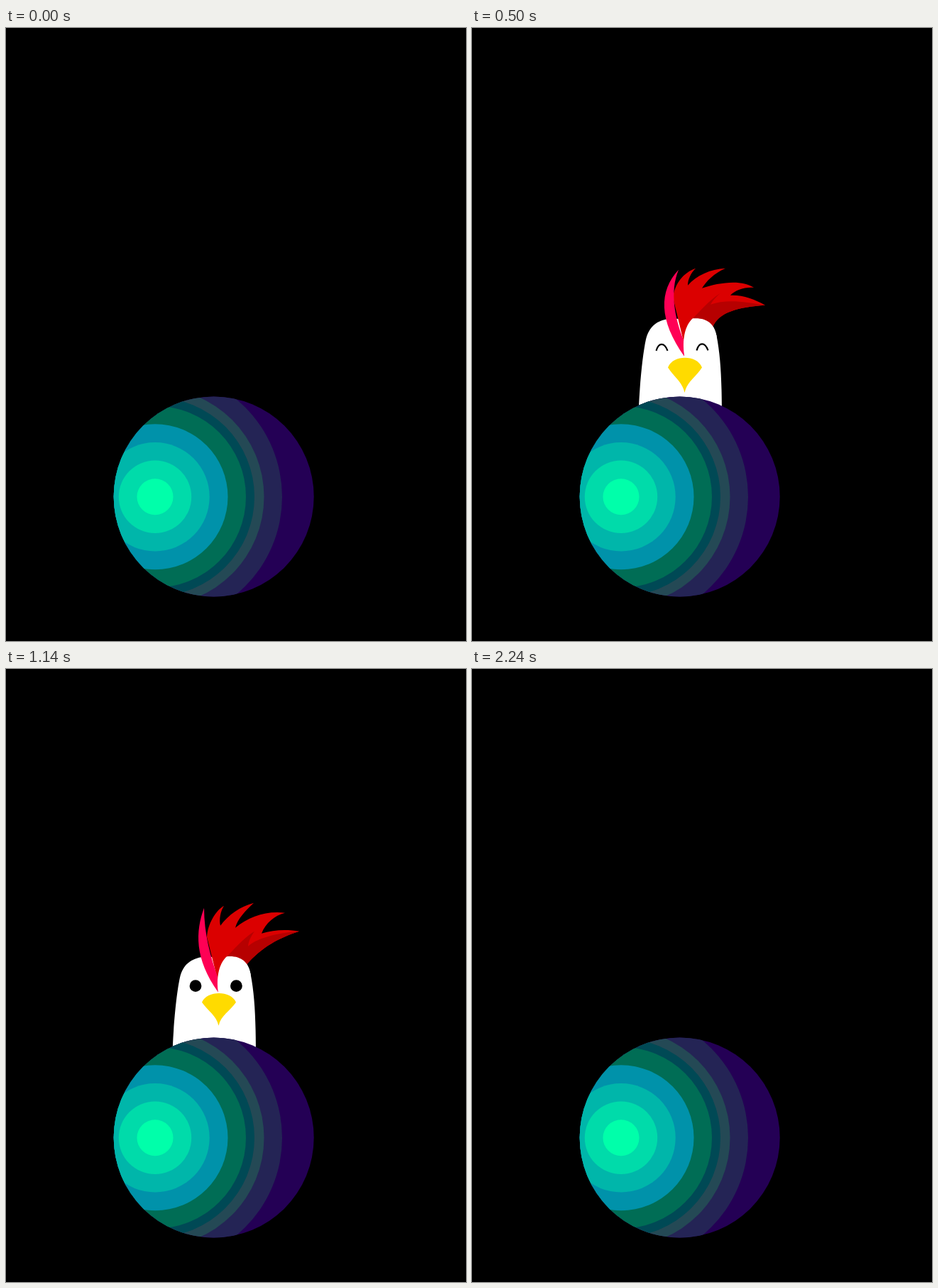
Recreate the animation shown at these times as an HTML page. Size 648 by 864 pixels, loop 2.42 s.

```html
<!DOCTYPE html>
<html>
<head>
<meta charset="utf-8">
<style>
html, body { margin: 0; height: 100%; overflow: hidden; background: #000; }
svg { display: block; width: 100vw; height: 100vh; }
</style>
</head>
<body>
<svg viewBox="0 0 648 864">
  <clipPath id="above"><rect width="648" height="660"/></clipPath>
  <clipPath id="disc"><circle cx="292.7" cy="660.5" r="141"/></clipPath>
  <g clip-path="url(#above)">
    <g id="bird">
      <path fill="#fff" d="M234 575V560C235 510 240 460 245 437C249 420 260 411 275 408.5L311 407.5C330 406 341 414 344.5 432C351 465 352 500 352 560V575Z"/>
      <path id="comb" fill="#db0000"/>
      <path id="shade" fill="#b60000"/>
      <path id="feather" fill="#ff0055"/>
      <path fill="#fff" d="M299 458C296 440 299 418 311 407.5C330 406 341 414 344.5 432L344 458Z"/>
      <path id="beak" fill="#ffdb00" d="M276 472C280 463 290 459.3 300 459.3C310 459.3 320 463 324 472C315 485 303 490 299.5 505C296 490 285 485 276 472Z"/>
      <g id="open">
        <circle cx="267" cy="449" r="8.4"/>
        <circle cx="324.4" cy="449" r="8.4"/>
      </g>
      <path id="closed" fill="none" stroke="#000" stroke-width="2.2" d="M259.5 453C263 441 271 441 275.5 453M316.5 452.6C320 440.6 328 440.6 332.5 452.6"/>
    </g>
  </g>
  <g id="ball" clip-path="url(#disc)"><rect y="500" width="648" height="364" fill="#240055"/></g>
</svg>
<script>
const $ = id => document.getElementById(id);
const LOOP = 2420, STEP = 20, REST = 407.5;

// Concentric bands, outermost first: [radius, colour]
const bands = [[179, '242455'], [153.5, '244955'], [140, '004955'], [128, '006d55'],
  [102.5, '0092aa'], [76.7, '00b6aa'], [51.2, '00dbaa'], [25.5, '00ffaa']];
$('ball').innerHTML += bands.map(([r, c]) =>
  `<circle cx="210" cy="660.8" r="${r}" fill="#${c}"/>`).join('');

// Each crest part: its resting path and its swept-down path
const crest = {
  comb: [
    'M298 440L283 380C284 362 295 343 307 336C302 344 300 355 302 364C313 349 330 337 349 332C337 343 326 355 323 367C343 351 366 343 393 346C378 350 366 360 360 375C376 370 395 369 413 372C385 381 360 394 338 420Z',
    'M298 440L283 378C286 358 298 343 315 337C308 344 304 353 304 361C316 347 336 338 357 337C341 344 330 355 324 365C346 357 380 352 397 364C384 363 371 367 364 375C380 374 398 380 413 389C375 392 348 398 339 420Z'],
  shade: [
    'M307 411C322 398 332 383 350 372C346 378 342 384 341 393C355 380 390 373 413 372C385 381 360 394 338 420Z',
    'M307 411C322 398 332 383 350 372C344 377 339 382 336 388C358 380 385 384 413 389C375 392 348 398 339 420Z'],
  feather: [
    'M279 339C267 372 265 410 299 458L298 436C288 408 279 375 279 339Z',
    'M291 339C263 369 263 410 299 461L298 438C286 408 278 370 291 339Z']
};

function mixPath([from, to], k) {
  const target = to.match(/[\d.]+/g);
  let i = 0;
  return from.replace(/[\d.]+/g, n => (+n + (target[i++] - n) * k).toFixed(2));
}

const smooth = p => (1 - Math.cos(Math.PI * p)) / 2;

// Cosine-eased value through [time, value] keys
function track(t, keys) {
  const i = keys.findIndex(key => key[0] > t);
  if (i < 0) return keys[keys.length - 1][1];
  if (!i) return keys[0][1];
  const [t0, a] = keys[i - 1], [t1, b] = keys[i];
  return a + (b - a) * smooth((t - t0) / (t1 - t0));
}

function headY(t) {
  if (t < 700) return 383 + 266 * (1 - Math.sin(Math.PI / 2 * t / 700));
  if (t < 1960) return track(t, [[700, 383], [880, 418], [1090, 404], [1220, REST]]);
  return Math.min(660, REST + 213 * ((t - 1960) / 260) ** 2);
}

function draw(t) {
  const sweep = track(t, [[0, 0], [480, 1], [500, 1], [820, -.25], [1080, 0], [1960, 0], [2200, -.25]]);
  const drop = Math.abs(sweep);
  const lid = track(t, [[1360, 1], [1520, .1], [1680, 1]]);
  const asleep = t < 680;

  $('bird').setAttribute('transform', `translate(0 ${headY(t) - REST})`);
  for (const id in crest) $(id).setAttribute('d', mixPath(crest[id], sweep));
  $('beak').setAttribute('transform',
    `translate(0 ${459 + 3.5 * drop}) scale(1 ${1 + .08 * drop}) translate(0 -459)`);
  $('open').setAttribute('transform', `translate(0 449) scale(1 ${lid}) translate(0 -449)`);
  $('open').style.display = asleep ? 'none' : '';
  $('closed').style.display = asleep ? '' : 'none';
}

const start = performance.now();
function tick() {
  const t = (performance.now() - start) % LOOP;
  draw(Math.floor(t / STEP) * STEP);
  requestAnimationFrame(tick);
}
tick();
</script>
</body>
</html>
```
